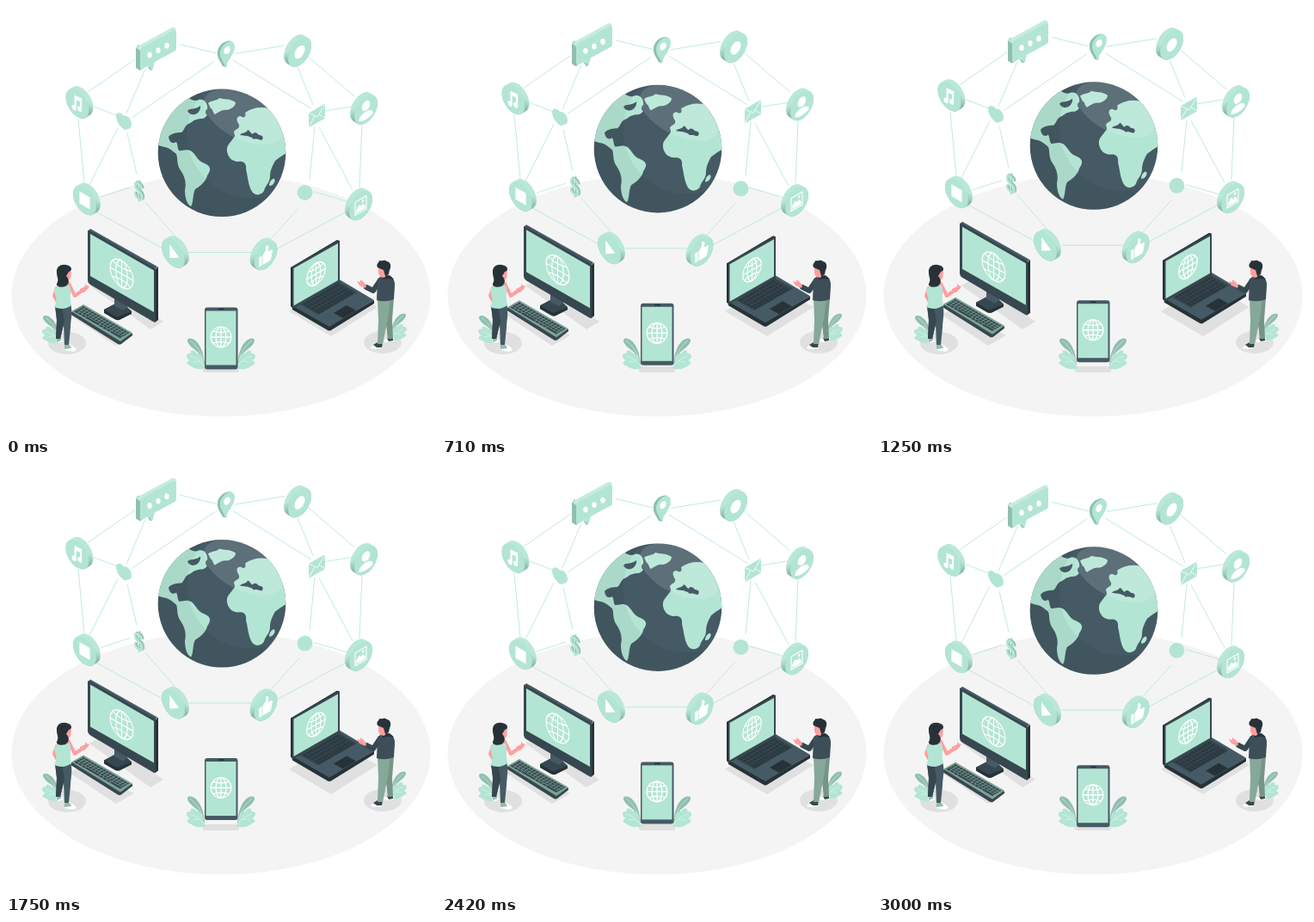
These frames come from a looping animation (500x500 px, 3040 ms). An HTML page:

```html
<!DOCTYPE html>
<html lang="en">
<head>
<meta charset="utf-8">
<title>Connected world</title>
<style>
html, body { margin: 0; width: 100%; height: 100%; overflow: hidden; background: #fff }
svg { display: block; width: 100%; height: 100% }
.mint { fill: #b3e5d4 } .sage { fill: #8fbfb0 } .dark { fill: #37474f }
.slate { fill: #455a64 } .ink { fill: #263238 } .skin { fill: #ff9f9f }
.white { fill: #fff } .shade { fill: #e0e0e0 }
.links { fill: none; stroke: #b3e5d4; stroke-width: .8 }
.wire { fill: none; stroke: #fff; stroke-width: 1.3 }
.fold { fill: none; stroke: #fff; stroke-width: .8 }
.keys { fill: none; stroke: #37474f; stroke-width: 2.6 }
.vein { fill: none; stroke: #fff; stroke-width: .6; opacity: .7 }
.arm { fill: none; stroke-width: 4; stroke-linecap: round; stroke-linejoin: round }
</style>
</head>
<body>
<svg viewBox="0 0 500 500">
<defs>
  <linearGradient id="edge" gradientUnits="userSpaceOnUse" x1="0" y1="-19" x2="0" y2="14">
    <stop offset=".3" stop-color="#b9e8d9"/><stop offset=".65" stop-color="#8fbcad"/>
  </linearGradient>
  <clipPath id="ball"><circle cx="251" cy="170.8" r="74.3"/></clipPath>
  <g id="disc">
    <path d="M0 0L5.8-5.9" stroke="url(#edge)" stroke-width="31" stroke-linecap="round"/>
    <circle r="15.5" class="mint"/>
  </g>
  <g id="bush">
    <path class="sage" d="M0 0C-3-10-4-16-11-21-18-26-22-32-19-34-14-36-7-30-4-22-1-15 0-8 0 0Z"/>
    <path class="mint" d="M1 0C-6 3-14 0-17-3-22-4-21-8-17-9-23-12-22-18-16-17-18-22-11-21-9-17-4-18-2-12-2-8Z"/>
    <path class="vein" d="M-1-8Q-6-24-17-32M0-2Q-6-11-17-14M-6-8L-14-7"/>
  </g>
</defs>

<ellipse cx="250" cy="336.5" rx="243.5" ry="141" fill="#f4f4f4"/>
<g class="shade">
  <path d="M97 325L111 317 183 367 168 376ZM74 359L90 350 149 383 128 395ZM329 355L382 323 432 350 378 384Z"/>
  <rect x="229" y="419" width="42" height="7" rx="2"/>
  <ellipse cx="71" cy="392" rx="22" ry="13"/>
  <ellipse cx="438" cy="391" rx="22" ry="13"/>
</g>
<use href="#bush" x="231" y="421"/>
<use href="#bush" transform="matrix(-1 0 0 1 269 421)"/>

<g id="float">
  <path class="links" d="M202 44.500L245 55M266 55.500L324 46M150 62L95 100M162 73L140 125M102 117L128 127M146 130L243 64M264 63L355 119.500M339 71L357 115M350 58L405 105M371 122L402 117M414 138L411 211M364 141L403 214M359 140L353 202M141 148L152 196M130 142L97 208M84 131L91 206M110 222L144 211M104 239L181 281M162 228L197 268M213 286.500H285M341 234L307 272M358 216L396 227M396 239L312 284"/>

  <g clip-path="url(#ball)">
    <circle cx="251" cy="170.800" r="75" class="slate"/>
    <path class="mint" d="M170 160V100H205C212 108 219 112 224 109 231 107 235 114 234 120 231 121 232 126 234 127 230 133 225 130 222 132 218 132 216 136 212 137 207 140 208 144 204 147 199 147 192 148 189 152 190 158 193 161 198 158 200 161 199 165 201 168 205 169 210 165 216 169 222 174 222 180 231 183 238 186 239 190 234 197 233 204 225 210 220 213 217 218 218 229 215 233 210 230 208 222 208 214 210 206 208 198 203 191 198 184 200 177 198 172 191 166 187 164 184 164 179 158Z"/>
    <path class="mint" d="M235 113C239 109 245 111 248 107 254 109 260 107 267 112 267 117 261 120 257 121 251 120 247 124 243 126 240 124 241 120 238 119Z"/>
    <path class="mint" d="M330 150V169C322 173 317 177 313 180 309 187 307 192 307 198 307 206 301 209 300 215 296 221 288 221 285 214 281 205 281 197 279 190 280 183 276 180 270 181 263 181 258 176 257 169 256 162 261 159 264 154 268 151 265 149 265 146 268 142 272 143 271 138 267 132 268 128 273 128 276 131 280 129 278 124 287 118 295 117 306 119 314 125 322 138Z"/>
    <path class="mint" d="M306 209C306 204 310 200 312 201 314 204 310 210 306 209Z"/>
    <circle cx="285" cy="149" r="114" fill="none" stroke="#000" stroke-width="80" opacity=".05"/>
    <ellipse cx="276" cy="129" rx="50" ry="26" transform="rotate(27 276 129)" fill="#fff" opacity=".13"/>
    <path class="slate" d="M211 122C214 118 220 121 226 116 227 120 223 126 219 126 217 127 213 126 211 122ZM272 150C274 147 280 148 281 144 284 145 284 148 287 149 288 146 292 147 294 150 299 150 300 154 297 156 293 155 291 154 288 155 287 153 281 151 279 151 272 150Z"/>
  </g>

  <path class="sage" d="M151 50Q151 47 154 45L158 49V73L156 75 151 72Z"/>
  <path fill="#c5ecdf" d="M151 48L193 25Q196 24 198 27L160 50 156 52Z"/>
  <path class="sage" d="M164 69L168 75 171 73Z"/>
  <path class="mint" d="M156 53Q156 50 159 48L195 28Q198 27 198 30V49Q198 52 195 53L173 65 170 75 166 69 159 73Q156 75 156 71Z"/>
  <g class="white"><ellipse cx="167" cy="57" rx="2.7" ry="3.4"/><ellipse cx="177" cy="51.600" rx="2.7" ry="3.4"/><ellipse cx="187" cy="46.200" rx="2.7" ry="3.4"/></g>

  <path class="sage" d="M252 70C249 64 245 60 246 53 247 45 256 39 262 41L256 71Z"/>
  <path class="mint" d="M255 71C253 64 249 62 249 55 249 48 256 41 261 41 267 41 267 50 264 55 261 61 257 65 255 71Z"/>
  <ellipse cx="257.300" cy="51.500" rx="3.400" ry="4.800" transform="rotate(28 257 51)" class="white"/>

  <path class="mint" d="M352 124.500L371 113.500V130.500L352 141.500Z"/>
  <path class="fold" d="M352 124.500L362 129 371 114M352 141L359 128M371 130L364 126"/>
  <path class="mint" d="M138 144C133 141 128 134 128 128 128 123 134 123 137 128 141 126 146 132 146 138 146 143 142 143 138 144Z"/>
  <g font-family="'Liberation Sans', Arial, sans-serif" font-size="30" font-weight="700" text-anchor="middle">
    <text class="sage" transform="matrix(.7 .4 0 1 155.500 224.500)">$</text>
    <text class="mint" transform="matrix(.7 .4 0 1 154 225.500)">$</text>
  </g>
  <circle cx="347.500" cy="217" r="9" class="mint"/>
  <g id="discs"></g>

  <!-- desktop -->
  <path class="ink" d="M126 336L141 344V351L146 355V358L132 365Q129 366 126 364L114 357V353L126 347Z"/>
  <path class="dark" d="M114 353L127 346 141 350 146 355 131 361Q129 362 126 360Z"/>
  <path class="slate" d="M126 336L141 344V350L136 354 126 349Z"/>
  <path class="slate" d="M95 262L98 259 176 303 173 307Z"/>
  <path class="ink" d="M173 307L177 303V365L173 368Z"/>
  <path class="dark" d="M95 262Q95 260 97 261L172 304Q174 305 174 308V366Q174 369 171 367L98 324Q95 322 95 319Z"/>
  <path class="mint" d="M98 265L172 307.500V356L98 314Z"/>
  <path class="dark" d="M76 356L90 349 147 381V383L134 393Q132 394 130 393L76 359Z"/>
  <path fill="#7ba396" d="M76 355L90 347 147 380 133 390Z"/>
  <g class="keys" transform="matrix(.866 .5 .866 -.5 76 355)">
    <path d="M2 3H64" stroke-dasharray="4 .8 4 .8 4 .8 18 .8"/>
    <path d="M2 6.200H64M2 9.400H64M2 12.600H64" stroke-dasharray="3.200 .8"/>
  </g>

  <!-- laptop -->
  <path class="ink" d="M332 347L376 372 428 342V346L378 377Q376 378 374 377L333 353Z"/>
  <path class="slate" d="M332 348L386 317 428 342 376 373Z"/>
  <path class="ink" d="M331 304L385 272 388 273V321L333 351 331 349Z"/>
  <path class="dark" d="M333 305Q333 303 335 302L386 273Q388 272 388 275V321L333 352Z"/>
  <path class="mint" d="M334.500 305L386 276V319L334.500 348.500Z"/>
  <path class="dark" d="M342 347L387 321 408 333 363 359Z"/>
  <g transform="matrix(.866 -.5 .866 .5 342 347)" fill="none" stroke="#2b383f" stroke-width="3.600">
    <path d="M2 3H50M2 8H50M2 13H50M2 18H50M2 22H50" stroke-dasharray="3.400 .9"/>
  </g>
  <path class="ink" d="M381 357L396 348 407 354 392 363Z"/>

  <!-- phone -->
  <rect x="231" y="350.500" width="38.500" height="72" rx="3" class="slate"/>
  <rect x="232.500" y="354.500" width="35" height="63" class="mint"/>
  <path d="M247 352.500H254" stroke="#263238" stroke-width="1.500"/>
  <g id="wires" class="wire"></g>
</g>

<!-- woman -->
<use href="#bush" transform="translate(62 391) scale(.95 .9)"/>
<path class="arm" stroke="#ff9f9f" d="M59 328L56 337 61 346M73 323L80 337 90 330"/>
<path class="skin" d="M86 329L92 326 92 323 94 325 97 326 95 329 91 333 87 333Z"/>
<path class="white" d="M59 387L64 386 67 390 61 392 58 390ZM68 394L74 393 80 397 82 400 78 402 68 400Z"/>
<path class="sage" d="M59 386L64 386 64 389 59 391ZM68 394L74 394 76 398 68 399Z"/>
<path class="slate" d="M57 348L75 346C78 357 75 365 75 374L73 394H68L67 370 63 387H58L59 365Z"/>
<path class="dark" d="M57 348L65 348 68 367 63 387H58L59 365Z"/>
<path class="mint" d="M58 327Q66 322 74 325C77 332 73 337 76 348Q67 355 56 350C61 341 57 335 56 331Z"/>
<path class="skin" d="M68 309Q73 304 76 309L75 317 72 319 73 325 67 326Z"/>
<path class="ink" d="M59 310C58 301 67 299 73 302 77 304 77 308 73 309L70 314C74 318 74 323 69 326 64 328 58 326 59 323 62 318 59 315 59 310Z"/>

<!-- man -->
<use href="#bush" transform="matrix(-.9 0 0 .88 447 388)"/>
<path class="white" d="M425 396L432 391 438 392 437 398 429 399 424 398ZM439 388L445 385 451 386 450 390 440 391Z"/>
<path class="dark" d="M427 394L432 391 438 392 437 397 431 397ZM443 386L450 385 450 389 445 390Z"/>
<path fill="#769587" d="M440 340H451L449 365 450 387H444L441 362Z"/>
<path fill="#86a899" d="M432 340H447L444 364 438 393H432L433 365Z"/>
<path class="arm" style="stroke-width:6" stroke="#37474f" d="M435 319L427 331 419 327"/>
<path class="skin" d="M418 328L411 325 408 320 412 321 412 318 416 321 419 325Z"/>
<path fill="#3d4e58" d="M432 318Q437 312 446 313 453 318 452 326L451 341Q441 345 431 342Z"/>
<path class="ink" d="M438 315Q447 312 451 318 446 316 438 318Z"/>
<path class="skin" d="M433 304L442 303 443 311 440 316 435 315 433 311Z"/>
<path class="ink" d="M432 304C430 299 434 299 434 296 438 297 440 294 443 297 448 298 448 304 446 307L445 312 441 314 439 307Z"/>
</svg>
<script>
const $ = id => document.getElementById(id);
const LEFT = 1, RIGHT = -1, FRONT = 0;
const plane = (x, y, side) => `matrix(${side ? .866 : 1} ${side * .5} 0 1 ${x} ${y})`;

const glyphs = {
  note: '<path class="white" d="M-4-8L6-9V5A3 3 0 1 1 3.500 2V-4L-1.500-3.500V7A3 3 0 1 1-4 4Z"/>',
  square: '<rect class="white" x="-7" y="-7" width="14" height="14"/>',
  play: '<path class="white" d="M-5-8L8 1-5 8Z"/>',
  dot: '<circle class="white" r="7"/>',
  user: '<circle class="white" cy="-4.500" r="5.500"/><path class="white" d="M-9.500 9C-9.500 0 9.500 0 9.500 9Q0 14-9.500 9Z"/>',
  photo: '<rect class="wire" x="-7.500" y="-7.500" width="15" height="15"/><path class="white" d="M-6 6V2L-2-2 1 1 3-1 6 3V6Z"/><circle class="white" cx="3" cy="-4" r="1.500"/>',
  thumb: '<path class="white" d="M-9-2H-5V9H-9ZM-4-2L0-6V-11Q4-11 4-7L3-3H8Q10-2 9 0L7 8Q6 9 4 9H-4Z"/>'
};

const disc = ([x, y, side, glyph]) => `<g transform="${plane(x, y, side)}">
  <use href="#disc" transform="scale(${side} 1)"/>${glyphs[glyph]}</g>`;

$('discs').innerHTML = [
  [83, 113.5, LEFT, 'note'], [91.5, 226, LEFT, 'square'], [194.5, 287.5, LEFT, 'play'],
  [341.5, 53.5, RIGHT, 'dot'], [418.5, 120.5, RIGHT, 'user'],
  [412.5, 232, RIGHT, 'photo'], [302, 290, RIGHT, 'thumb']
].map(disc).join('');

const wire = ([x, y, side, r]) => `<g transform="${plane(x, y, side)}">
  <circle r="${r}"/><ellipse rx="${r * .5}" ry="${r}"/>
  <path d="M0 ${-r}V${r}M${-r} 0H${r}M${-.8 * r} ${-.6 * r}Q0 ${-.3 * r} ${.8 * r} ${-.6 * r}M${-.8 * r} ${.6 * r}Q0 ${.3 * r} ${.8 * r} ${.6 * r}"/></g>`;

$('wires').innerHTML = [
  [134.5, 311.5, LEFT, 15.5], [360.5, 311.5, RIGHT, 12.5], [250, 385, FRONT, 11.8]
].map(wire).join('');

// Everything above the floor rises and sinks at a steady pace.
const LOOP = 3040, RISE = 10;
function draw(now) {
  const p = now % LOOP / LOOP;
  const lift = RISE * (1 - Math.abs(1 - 2 * p));
  $('float').setAttribute('transform', `translate(0 ${-lift})`);
  requestAnimationFrame(draw);
}
draw(performance.now());
</script>
</body>
</html>
```
